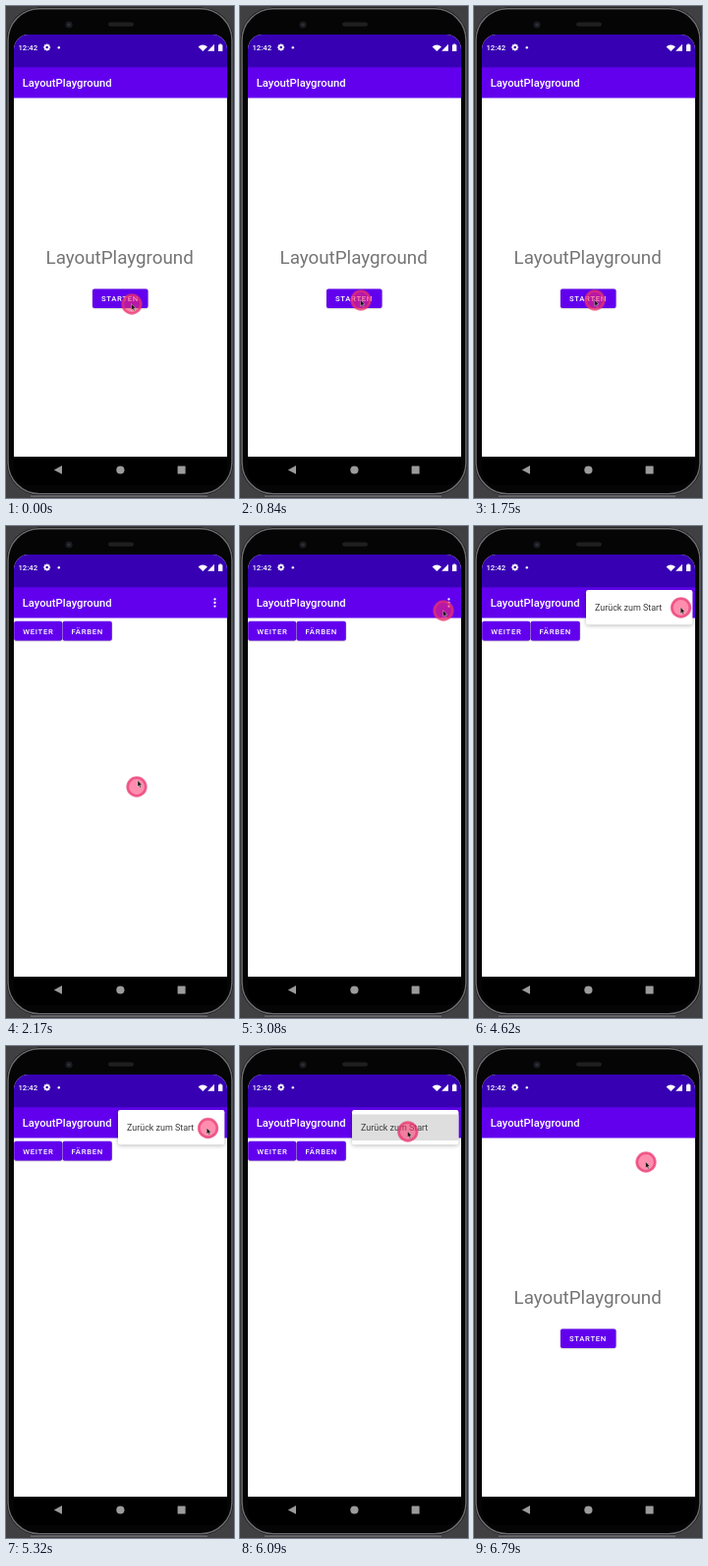
An HTML page with a canvas for the animation above (6860 ms loop, 232 px wide and 500 px high).

```html
<!DOCTYPE html>
<html lang="de">
<head>
<meta charset="utf-8">
<title>LayoutPlayground</title>
<style>
html, body { margin: 0; width: 100%; height: 100%; overflow: hidden; background: #404042; }
canvas { display: block; width: 232px; height: 500px; }
</style>
</head>
<body>
<canvas id="stage"></canvas>
<script>
const W = 232, H = 500, LOOP = 6860, STEP = 70;
const INDIGO = '#3700b3', PURPLE = '#6200ee';
const canvas = document.getElementById('stage');
const c = canvas.getContext('2d');
const dpr = window.devicePixelRatio || 1;
canvas.width = W * dpr;
canvas.height = H * dpr;

// time, x, y of the pointer
const PATH = [
  [0, 128, 303], [420, 125, 300], [700, 123, 299], [1750, 123, 299],
  [2030, 126, 297], [2170, 133, 265], [2310, 160, 168], [2520, 198, 96],
  [2800, 207, 86], [3220, 207, 86], [3780, 210.6, 83], [5180, 210.6, 83],
  [5810, 170.8, 87], [6230, 170.8, 87], [6650, 175, 118], [6860, 175, 118]
];

const clamp = v => Math.max(0, Math.min(1, v));
const phase = (t, a, b) => clamp((t - a) / (b - a));
const easeOut = p => 1 - (1 - p) ** 3;

function slope(i, k) {
  const a = PATH[i], b = PATH[i + 1];
  return a && b ? (b[k] - a[k]) / (b[0] - a[0]) : 0;
}

// smooth tangent that never overshoots a rest
function tangent(i, k) {
  const p = slope(i - 1, k), q = slope(i, k);
  return p * q > 0 ? 2 * p * q / (p + q) : 0;
}

function pointer(t) {
  t = Math.min(t, LOOP - 1);
  const i = PATH.findIndex((p, n) => t < PATH[n + 1][0]);
  const d = PATH[i + 1][0] - PATH[i][0], u = (t - PATH[i][0]) / d;
  return [1, 2].map(k =>
    PATH[i][k] * (1 + 2 * u) * (1 - u) ** 2 + PATH[i + 1][k] * u * u * (3 - 2 * u) +
    d * u * (1 - u) * (tangent(i, k) * (1 - u) - tangent(i + 1, k) * u));
}

function rect(x, y, w, h, color, r = 0) {
  c.beginPath();
  c.roundRect(x, y, w, h, r);
  c.fillStyle = color;
  c.fill();
}

function outline(x, y, w, h, r, color, width) {
  c.beginPath();
  c.roundRect(x, y, w, h, r);
  c.strokeStyle = color;
  c.lineWidth = width;
  c.stroke();
}

function disc(x, y, r, color) {
  c.beginPath();
  c.arc(x, y, r, 0, 7);
  c.fillStyle = color;
  c.fill();
}

function poly(points, color) {
  c.beginPath();
  points.forEach(([x, y]) => c.lineTo(x, y));
  c.closePath();
  c.fillStyle = color;
  c.fill();
}

function text(s, x, y, size, weight, color, spacing = 0) {
  c.font = `${weight} ${size}px Roboto, sans-serif`;
  c.letterSpacing = spacing + 'px';
  c.fillStyle = color;
  c.fillText(s, x, y);
  c.letterSpacing = '0px';
}

function shadow(color, blur, y) {
  c.shadowColor = color;
  c.shadowBlur = blur * dpr;
  c.shadowOffsetY = y * dpr;
}

function button(label, x, y, w) {
  c.save();
  shadow('rgba(0,0,0,.3)', 1.5, 0.5);
  rect(x, y, w, 19.6, PURPLE, 2);
  c.restore();
  text(label, x + 9, y + 12.7, 7.73, 500, '#fff', 0.69);
}

function phone() {
  rect(0, 0, W, H, '#404042');
  rect(25, 497.6, 180, 1.2, '#77777a');
  rect(0.8, 1.5, 230.4, 495.5, '#050506', 33);
  outline(2, 2.8, 228, 493, 32, '#6a6a6d', 1.6);
  rect(104, 16.4, 26, 4.4, '#1f1f21', 2.2);
  disc(64, 19, 3.6, '#1a1c20');
  disc(64, 19, 1.6, '#2c3038');
}

function header() {
  rect(8, 29, 217, 34, INDIGO);
  rect(8, 62.3, 217, 31.2, PURPLE);
  text('LayoutPlayground', 16.7, 82.2, 11.26, 500, '#fff');
}

function startScreen() {
  rect(8, 29, 217, 430, '#fff');
  header();
  text('LayoutPlayground', 40.6, 261.6, 18.8, 400, '#757575');
  button('STARTEN', 88, 287.5, 56.5);
}

function mainScreen() {
  rect(8, 29, 217, 430, '#fff');
  header();
  for (const y of [74.4, 78, 81.6]) disc(212.5, y, 1.15, '#fff');
  button('WEITER', 8.2, 96.8, 49);
  button('FÄRBEN', 57.6, 96.8, 50.2);
}

function scaled(draw, scale, alpha) {
  c.save();
  c.globalAlpha = alpha;
  c.translate(116.5, 244);
  c.scale(scale, scale);
  c.translate(-116.5, -244);
  draw();
  c.restore();
}

function popup(t) {
  const open = easeOut(phase(t, 3200, 3430)), shut = phase(t, 6180, 6300);
  if (!open || shut === 1) return;
  c.save();
  c.globalAlpha = open * (1 - shut);
  c.translate(222.4, 65);
  c.scale(0.6 + 0.4 * open, 0.6 + 0.4 * open);
  c.translate(-222.4, -65);
  c.save();
  shadow('rgba(0,0,0,.28)', 4, 1);
  rect(114, 65, 108.4, 35.2, '#fff', 2.2);
  c.restore();
  if (t >= 6020) rect(114, 69.4, 108.4, 26.6, '#dedede');
  text('Zurück zum Start', 123, 86, 8.95, 400, '#3c3c3c');
  c.restore();
}

function statusBar() {
  text('12:42', 12.4, 45.2, 7.8, 500, '#fff');
  for (let i = 0; i < 8; i++) {
    c.save();
    c.translate(41.7, 42);
    c.rotate(i * Math.PI / 4);
    rect(-0.8, -3.5, 1.6, 2, '#fff');
    c.restore();
  }
  disc(41.7, 42, 2.7, '#fff');
  disc(41.7, 42, 1.3, INDIGO);
  disc(53.8, 42.2, 1.2, '#fff');
  c.beginPath();
  c.moveTo(200.3, 46);
  c.arc(200.3, 46, 6.4, -Math.PI * 0.76, -Math.PI * 0.24);
  c.closePath();
  c.fillStyle = '#fff';
  c.fill();
  poly([[205.2, 45.8], [212, 45.8], [212, 38.8]], '#fff');
  rect(216, 39.3, 4.4, 6.7, '#fff', 0.6);
  rect(217.2, 38.5, 2, 1.2, '#fff');
}

function navBar() {
  rect(8, 458, 217, 29, '#000');
  poly([[48.8, 471.4], [57, 467], [57, 475.8]], '#9b9b9b');
  disc(116.4, 471.5, 4.1, '#9b9b9b');
  rect(174.6, 467.5, 8, 8, '#9b9b9b', 0.5);
}

function cursor(t) {
  const [x, y] = pointer(t), [ax, ay] = pointer(t + 14);
  disc(x, y, 10, 'rgba(255,45,105,.54)');
  c.beginPath();
  c.arc(x, y, 9.3, 0, 7);
  c.lineWidth = 2.8;
  c.strokeStyle = 'rgba(230,50,110,.65)';
  c.stroke();
  c.save();
  c.translate(ax - 0.4, ay - 0.4);
  const arrow = [[0, 0], [0, 6.4], [1.5, 5.1], [2.5, 7.4], [3.5, 6.9], [2.5, 4.7], [4.4, 4.6]];
  poly(arrow, '#111');
  c.lineWidth = 0.5;
  c.strokeStyle = 'rgba(255,255,255,.7)';
  c.stroke();
  c.restore();
}

function app(t) {
  const go = phase(t, 1890, 2150), back = phase(t, 6230, 6500);
  if (go < 1 || back > 0) startScreen();
  if (go > 0 && back < 1) {
    const scale = back ? 1 - 0.1 * easeOut(back) : 0.88 + 0.12 * easeOut(go);
    const alpha = back ? 1 - clamp(back * 2) : clamp(go * 2);
    scaled(mainScreen, scale, alpha);
  }
}

function draw(t) {
  c.setTransform(dpr, 0, 0, dpr, 0, 0);
  phone();
  c.save();
  c.beginPath();
  c.roundRect(8, 29, 217, 458, 15);
  c.clip();
  app(t);
  popup(t);
  statusBar();
  navBar();
  c.restore();
  cursor(t);
}

const start = performance.now();
function tick() {
  const t = (performance.now() - start) % LOOP;
  draw(Math.floor(t / STEP) * STEP);
  requestAnimationFrame(tick);
}
tick();
</script>
</body>
</html>
```
